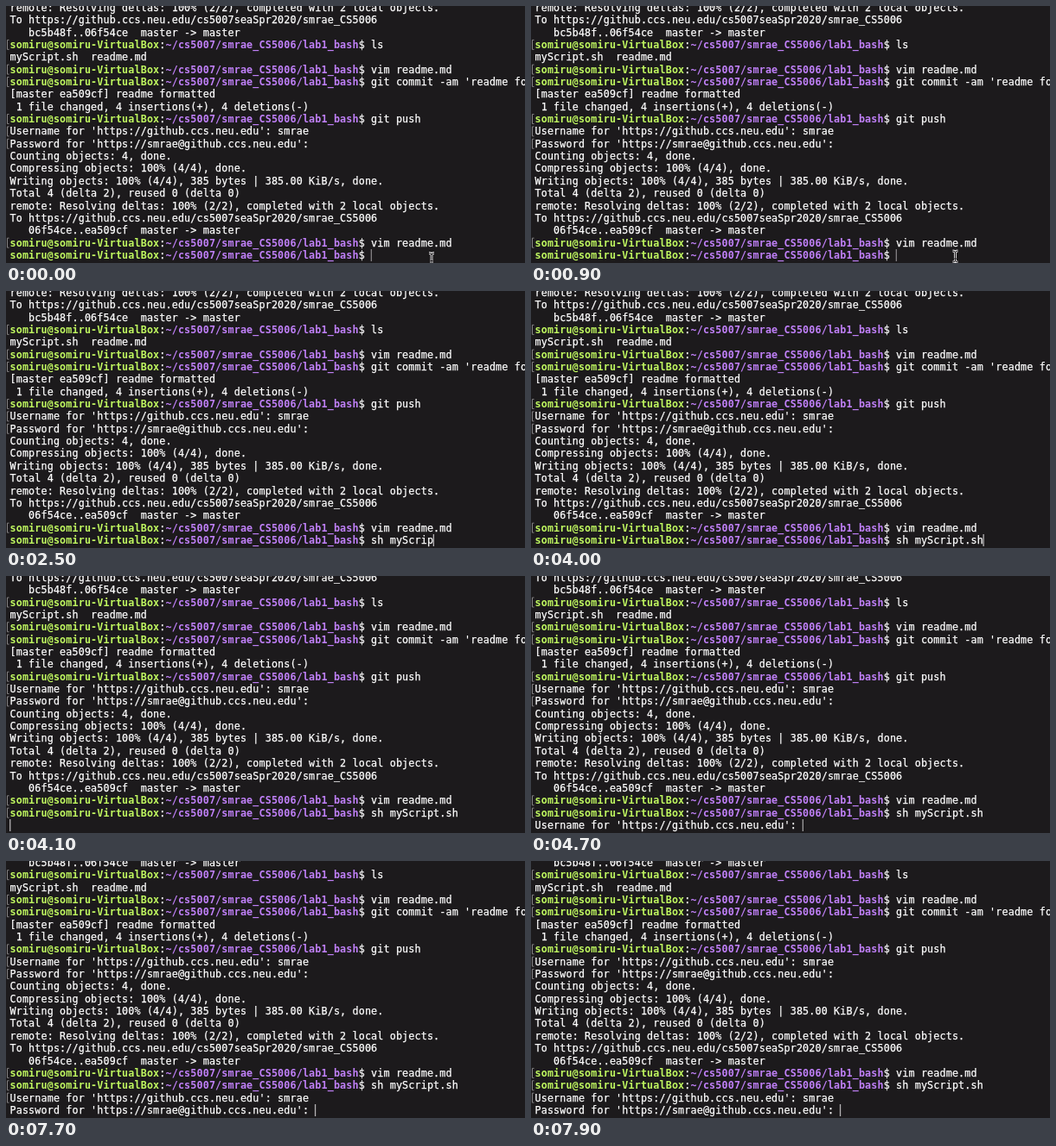
An HTML page with a canvas that plays this animation: 600x298 px, repeating every 8000 ms.

```html
<!DOCTYPE html>
<html lang="en">
<head>
<meta charset="utf-8">
<title>Terminal session</title>
<style>
  html, body { margin: 0; width: 100%; height: 100%; overflow: hidden; background: #1c1a1c; }
  canvas { display: block; width: 600px; height: 298px; }
</style>
</head>
<body>
<canvas id="stage" width="600" height="298"></canvas>
<script>
const canvas = document.getElementById('stage');
const ctx = canvas.getContext('2d');

const LOOP = 8000;
const LEFT = 4.5, CELL = 7.2, ROW = 14.36, BASE = 293;
const FONT = '11.7px "DejaVu Sans Mono", "Noto Sans Mono", monospace';
const WHITE = '#ffffff', GREEN = '#c0f860', PURPLE = '#c080f8', BACK = '#1c1a1c';

const USER = 'smrae';
const HOST = 'github.ccs.neu.edu';
const REPO = USER + '_CS5006';
const ASK_NAME = `Username for 'https://${HOST}': `;
const ASK_PASS = `Password for 'https://${USER}@${HOST}': `;
const REMOTE = 'remote: Resolving deltas: 100% (2/2), completed with 2 local objects.';
const DEST = `To https://${HOST}/cs5007seaSpr2020/${REPO}`;

const PROMPT = [
  ['somiru@somiru-VirtualBox', GREEN, true],
  [':', WHITE],
  [`~/cs5007/${REPO}/lab1_bash`, PURPLE, true],
  ['$ ', WHITE]
];

const out = text => ({ parts: [[text, WHITE]] });
const shell = (cmd, mark = true) => ({ parts: [...PROMPT, [cmd, WHITE]], mark });
const ask = (text, mark = true) => ({ parts: [[text, WHITE]], mark });

const history = [
  out(REMOTE),
  out(DEST),
  out('   bc5b48f..06f54ce  master -> master'),
  shell('ls'),
  out('myScript.sh  readme.md'),
  shell('vim readme.md'),
  shell("git commit -am 'readme formatted'"),
  out('[master ea509cf] readme formatted'),
  out(' 1 file changed, 4 insertions(+), 4 deletions(-)'),
  shell('git push'),
  ask(ASK_NAME + USER),
  ask(ASK_PASS),
  out('Counting objects: 4, done.'),
  out('Compressing objects: 100% (4/4), done.'),
  out('Writing objects: 100% (4/4), 385 bytes | 385.00 KiB/s, done.'),
  out('Total 4 (delta 2), reused 0 (delta 0)'),
  out(REMOTE),
  out(DEST),
  out('   06f54ce..ea509cf  master -> master'),
  shell('vim readme.md')
];

// Each list holds [start time, value] steps.
const COMMAND = [
  [0, ''], [1000, 's'], [1200, 'sh'], [1400, 'sh '], [1500, 'sh m'], [1700, 'sh my'],
  [1900, 'sh myS'], [2200, 'sh mySc'], [2400, 'sh myScri'], [2500, 'sh myScrip'],
  [2800, 'sh myScript'], [3000, 'sh myScript.'], [3400, 'sh myScript.s'], [3600, 'sh myScript.sh']
];
const LOGIN = [
  [0, ''], [5700, 's'], [5800, 'sm'], [6000, 'smt'], [6100, 'smta'], [6300, 'smtae'],
  [6700, 'smta'], [6800, 'smt'], [6900, 'sm'], [7000, 'smr'], [7200, 'smra'], [7400, USER]
];
const BLINK = [
  [0, .6], [100, .3], [200, 0], [300, .5], [400, .9], [900, .6], [1000, .9],
  [4500, .4], [4600, 0], [4700, .75], [4900, .9], [5400, .5], [5500, 0], [5700, .9]
];
const ENTER_COMMAND = 4100, SHOW_LOGIN = 4200, ENTER_LOGIN = 7600;
const POINTER_HIDES = 1000;

function at(steps, t) {
  let value = steps[0][1];
  for (const [start, next] of steps) if (t >= start) value = next;
  return value;
}

function linesAt(t) {
  if (t < ENTER_COMMAND) return [...history, shell(at(COMMAND, t), false)];
  const lines = [...history, shell('sh myScript.sh')];
  if (t < SHOW_LOGIN) return [...lines, out('')];
  if (t < ENTER_LOGIN) return [...lines, ask(ASK_NAME + at(LOGIN, t), false)];
  return [...lines, ask(ASK_NAME + USER), ask(ASK_PASS, false)];
}

// Draws on the character grid and returns the column after the text.
function drawLine(line, y) {
  let col = 0;
  for (const [text, color, bold] of line.parts) {
    ctx.font = (bold ? 'bold ' : '') + FONT;
    ctx.fillStyle = ctx.strokeStyle = color;
    ctx.lineWidth = 0.25;
    for (const ch of text) {
      const x = LEFT + CELL * col++;
      ctx.fillText(ch, x, y);
      if (!bold) ctx.strokeText(ch, x, y);
    }
  }
  if (line.mark) {
    ctx.strokeStyle = '#858385';
    ctx.lineWidth = 1;
    ctx.beginPath();
    ctx.moveTo(3.5, y - 9.5);
    ctx.lineTo(1.5, y - 9.5);
    ctx.lineTo(1.5, y + 1.5);
    ctx.lineTo(3.5, y + 1.5);
    ctx.stroke();
  }
  return col;
}

function drawPointer(t) {
  const p = Math.min(1, Math.max(0, (t - 100) / 300));
  const x = 492 - 1.5 * p, y = 293 - 2.5 * p;
  ctx.beginPath();
  for (const s of [-1, 1]) {
    ctx.moveTo(x - 3, y + s * 6.5);
    ctx.quadraticCurveTo(x, y + s * 6.5, x, y + s * 4.5);
    ctx.quadraticCurveTo(x, y + s * 6.5, x + 3, y + s * 6.5);
  }
  ctx.moveTo(x, y - 4.5);
  ctx.lineTo(x, y + 4.5);
  ctx.moveTo(x - 1.5, y + 2.5);
  ctx.lineTo(x + 1.5, y + 2.5);
  for (const [width, color] of [[2.8, '#e8e6e8'], [1, '#1a181a']]) {
    ctx.lineWidth = width;
    ctx.strokeStyle = color;
    ctx.stroke();
  }
}

function draw(t) {
  ctx.fillStyle = BACK;
  ctx.fillRect(0, 0, 600, 298);

  const lines = linesAt(t);
  let col = 0;
  lines.forEach((line, i) => {
    col = drawLine(line, BASE - ROW * (lines.length - 1 - i));
  });

  ctx.globalAlpha = at(BLINK, t);
  ctx.fillStyle = '#c6c4c6';
  ctx.fillRect(LEFT + CELL * col - 0.4, 282, 1.3, 14);
  ctx.globalAlpha = 1;

  if (t < POINTER_HIDES) drawPointer(t);
}

function frame() {
  draw(performance.now() % LOOP);
  requestAnimationFrame(frame);
}
frame();
</script>
</body>
</html>
```
